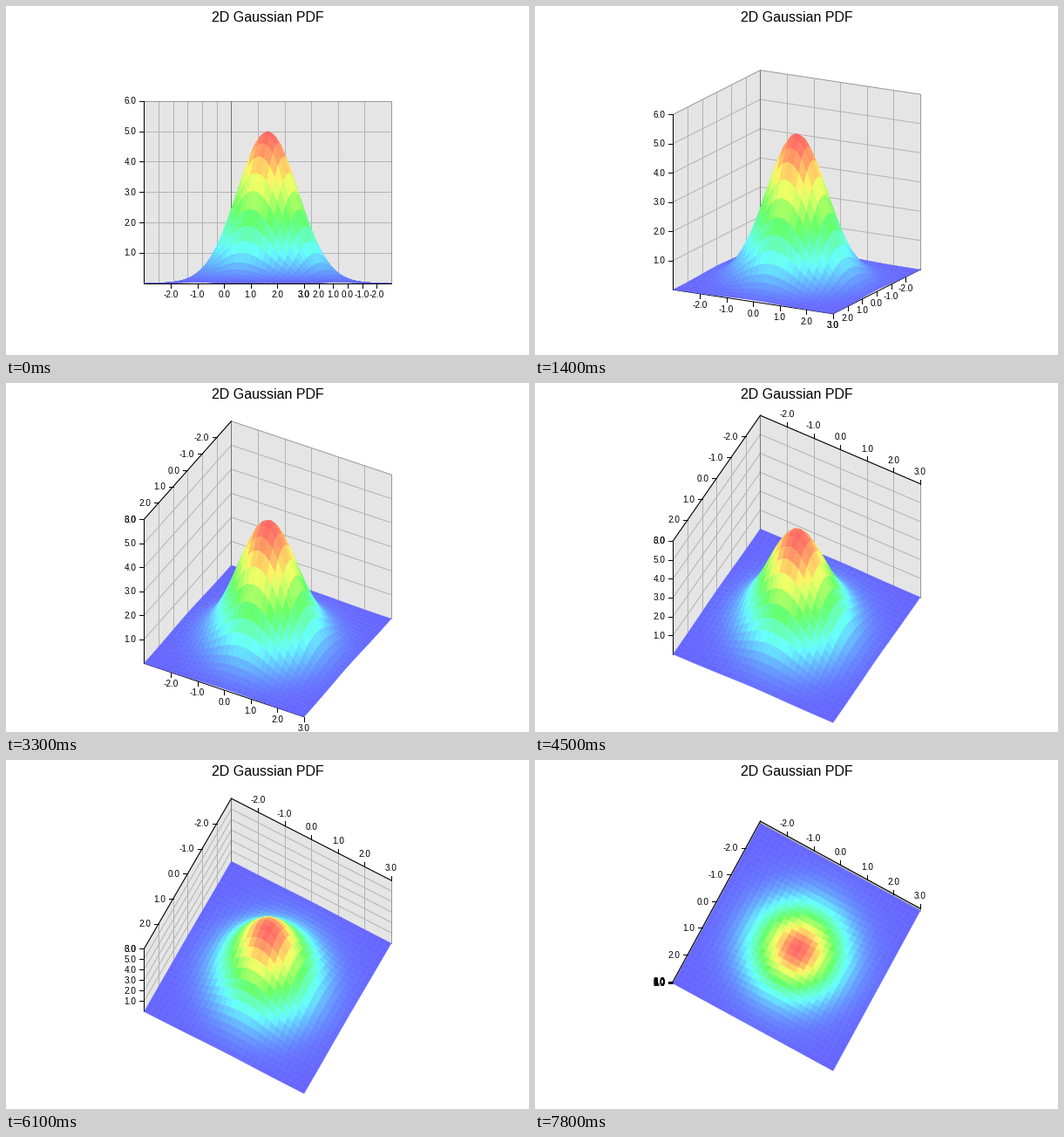
Recreate the animation shown at these times as a matplotlib script. Size 600 by 400 pixels, loop 8 s.

```python
import numpy as np
import matplotlib.pyplot as plt
from matplotlib.animation import FuncAnimation
from matplotlib.collections import LineCollection, PolyCollection

W, H, DPI = 600, 400, 100
PX = 72 / DPI                      # points per pixel
FRAMES, LAST = 80, 78
MAX_ELEV = 89.3
ROT = np.radians(28.6)
CX, CY, UNIT = 300.2, 213.2, 209 / 6
Y_FLIP, X_FLIP = 31, 40            # elevations where an axis moves to the top

plt.rcParams["font.family"] = "Liberation Sans"
fig = plt.figure(figsize=(W / DPI, H / DPI), dpi=DPI, facecolor="white")
ax = fig.add_axes([0, 0, 1, 1])
ax.set_xlim(0, W)
ax.set_ylim(H, 0)
ax.axis("off")


def project(p, elev):
    """Orthographic view of data points (..., 3) as pixel positions."""
    x, y, z = np.moveaxis(np.asarray(p, float), -1, 0)
    depth = x * np.sin(ROT) + y * np.cos(ROT)
    sx = CX + UNIT * (x * np.cos(ROT) - y * np.sin(ROT))
    sy = CY + UNIT * (depth * np.sin(elev) - (z - 3) * np.cos(elev))
    return np.stack([sx, sy], axis=-1)


def rainbow(t):
    stops = [0, .25, .5, .75, 1]
    rgb = [np.interp(t, stops, c) for c in
           ([0, 0, 0, 1, 1], [0, 1, 1, 1, 0], [1, 1, 0, 0, 0])]
    return .4 + .6 * np.stack(rgb, axis=-1)


# Surface cells, sorted back to front; each takes the colour of its back corner
g = np.linspace(-3, 3, 31)
X, Y = np.meshgrid(g, g)
P = np.stack([X, Y, 5 * np.exp(-(X**2 + Y**2) / 2)], axis=-1)
cells = np.stack([P[:-1, :-1], P[:-1, 1:], P[1:, 1:], P[1:, :-1]], axis=2)
cells = cells.reshape(-1, 4, 3)
back = cells[:, 0]
order = np.argsort(back[:, 0] * np.sin(ROT) + back[:, 1] * np.cos(ROT))
cells, colors = cells[order], rainbow(back[order, 2] / 5)

# Back walls with their grid and borders
walls = [[(-3, 3, 0), (-3, -3, 0), (-3, -3, 6), (-3, 3, 6)],
         [(3, -3, 0), (-3, -3, 0), (-3, -3, 6), (3, -3, 6)]]
grid = []
for k in range(-2, 3):
    grid += [[(-3, k, 0), (-3, k, 6)], [(k, -3, 0), (k, -3, 6)]]
for k in range(1, 6):
    grid += [[(-3, 3, k), (-3, -3, k)], [(-3, -3, k), (3, -3, k)]]
borders = [[(-3, 3, 6), (-3, -3, 6)], [(-3, -3, 6), (3, -3, 6)],
           [(3, -3, 0), (3, -3, 6)], [(-3, -3, 0), (-3, -3, 6)]]


def lines(color, z):
    lc = LineCollection([], colors=color, linewidths=PX, zorder=z,
                        capstyle="projecting")
    return ax.add_collection(lc)


wall_art = ax.add_collection(PolyCollection([], facecolors="#e5e5e5",
                                            edgecolors="none", zorder=1))
grid_art = lines("#b3b3b3", 2)
border_art = lines(["#999999"] * 3 + ["#6f766f"], 3)
axis_art = lines("black", 4)
surface_art = ax.add_collection(PolyCollection(
    [], facecolors=colors, edgecolors=colors, linewidths=.4 * PX, zorder=5))

ax.text(CX, 18, "2D Gaussian PDF", size=16 * PX, ha="center", va="baseline")


def make_labels(values):
    return [ax.text(0, 0, f"{v:.1f}", size=10 * PX, va="baseline", zorder=6)
            for v in values]


PLANE, HEIGHT = range(-2, 4), range(1, 7)
x_labels, y_labels, z_labels = map(make_labels, (PLANE, PLANE, HEIGHT))

# Side of an axis: tick vector, label offset, alignment
BELOW = (0, 5), (0, 13), "center"
ABOVE = (0, -5), (0, -14.5), "center"
LEFT = (-5, 0), (-9, 0), "right"


def lay_axis(ends, points, labels, side, elev):
    """Place the labels of one axis; return its line and ticks."""
    tick, offset, align = side
    spots = project(points, elev)
    for label, (x, y) in zip(labels, spots):
        label.set_position((x + offset[0], y + offset[1] + 3.6))
        label.set_ha(align)
    return [project(ends, elev)] + [[s, s + tick] for s in spots]


def update(i):
    deg = MAX_ELEV * min(i, LAST) / LAST
    e = np.radians(deg)
    wall_art.set_verts(project(walls, e))
    grid_art.set_segments(project(grid, e))
    border_art.set_segments(project(borders, e))
    surface_art.set_verts(project(cells, e))

    yx, yz, y_side = (-3, 6, LEFT) if deg >= Y_FLIP else (3, 0, BELOW)
    xy, xz, x_side = (-3, 6, ABOVE) if deg >= X_FLIP else (3, 0, BELOW)
    segs = lay_axis([(-3, 3, 0), (-3, 3, 6)], [(-3, 3, k) for k in HEIGHT],
                    z_labels, LEFT, e)
    segs += lay_axis([(yx, -3, yz), (yx, 3, yz)], [(yx, k, yz) for k in PLANE],
                     y_labels, y_side, e)
    segs += lay_axis([(-3, xy, xz), (3, xy, xz)], [(k, xy, xz) for k in PLANE],
                     x_labels, x_side, e)
    axis_art.set_segments(segs)
    return []


anim = FuncAnimation(fig, update, frames=FRAMES, interval=100,
                     repeat=True, repeat_delay=0, blit=False)
plt.show()
```
